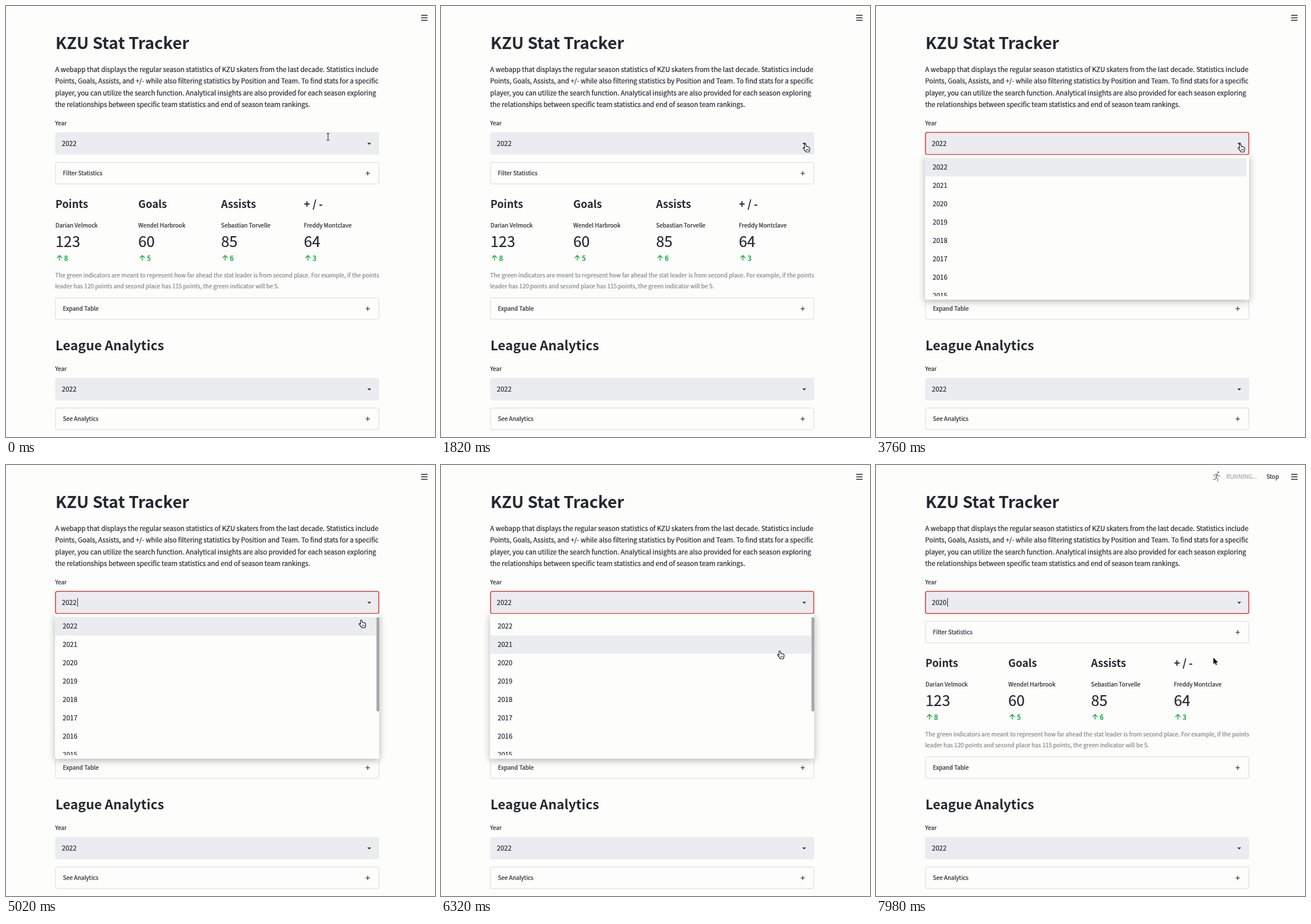
Recreate the animation shown at these times as an HTML page with a canvas. Size 746 px wide and 751 px high, loop 8 s.

```html
<!DOCTYPE html>
<html lang="en">
<head>
<meta charset="utf-8">
<title>Stat Tracker</title>
<style>
  html, body { margin: 0; width: 100%; height: 100%; overflow: hidden; background: #fdfdfd; }
  canvas { display: block; width: 746px; height: 751px; }
</style>
</head>
<body>
<canvas id="stage"></canvas>
<script>
const W = 746, H = 751, LOOP = 8000;
const FONT = '"Noto Sans CJK JP", "Noto Sans CJK SC", "Noto Sans CJK", sans-serif';
const EM = 0.8985; // the Latin glyphs of this family are drawn large
const INK = '#262730', FIELD = '#ebecf0', PAGE = '#fdfdfc';
const LEFT = 85.5, WIDE = 563.5;
const FOCUS = 2250, OPEN = 2280, PICK = 7360, RUN = 7600, BLINK = 450;

const INTRO = [
  'A webapp that displays the regular season statistics of KZU skaters from the last decade. Statistics include',
  'Points, Goals, Assists, and +/- while also filtering statistics by Position and Team. To find stats for a specific',
  'player, you can utilize the search function. Analytical insights are also provided for each season exploring',
  'the relationships between specific team statistics and end of season team rankings.'
];
const NOTE = [
  'The green indicators are meant to represent how far ahead the stat leader is from second place. For example, if the points',
  'leader has 120 points and second place has 115 points, the green indicator will be 5.'
];
const LEADERS = [
  ['Points', 'Darian Velmock', '123', '8'],
  ['Goals', 'Wendel Harbrook', '60', '5'],
  ['Assists', 'Sebastian Torvelle', '85', '6'],
  ['+ / -', 'Freddy Montclave', '64', '3']
];
// time, x, y of the pointer's hot spot
const PATH = [
  [0, 560, 228], [100, 560, 228], [760, 627.5, 239], [1300, 627.5, 239],
  [1800, 633.5, 241], [4700, 633.5, 241], [5500, 589, 324.5],
  [6500, 589, 324.5], [7000, 586.7, 335.8], [LOOP, 586.7, 335.8]
];

const canvas = document.getElementById('stage');
const ratio = window.devicePixelRatio || 1;
canvas.width = W * ratio;
canvas.height = H * ratio;
const c = canvas.getContext('2d');
c.scale(ratio, ratio);

const clamp = v => Math.max(0, Math.min(1, v));

function text(str, x, y, size, color = INK, weight = 400) {
  c.font = `${weight} ${size * EM}px ${FONT}`;
  c.fillStyle = color;
  c.fillText(str, x, y);
  if (weight >= 700) return;
  // a hairline gives body text its slightly fuller weight
  c.strokeStyle = color;
  c.lineWidth = weight > 400 ? 0.5 : 0.22;
  c.strokeText(str, x, y);
}

function box(x, y, w, h, r, fill, line, width = 1) {
  c.beginPath();
  c.roundRect(x, y, w, h, r);
  if (fill) { c.fillStyle = fill; c.fill(); }
  if (line) { c.strokeStyle = line; c.lineWidth = width; c.stroke(); }
}

function lines(color, width, ...paths) {
  c.strokeStyle = color;
  c.lineWidth = width;
  c.beginPath();
  for (const p of paths) {
    c.moveTo(p[0], p[1]);
    for (let i = 2; i < p.length; i += 2) c.lineTo(p[i], p[i + 1]);
  }
  c.stroke();
}

function select(y, value, focused) {
  box(LEFT, y, WIDE, 39, 3, FIELD);
  if (focused) box(LEFT + 0.7, y + 0.3, WIDE - 1.4, 38.4, 3, null, '#e23a36', 1.6);
  text(value, 97, y + 24, 12.8);
  c.fillStyle = INK;
  c.beginPath();
  c.moveTo(628.3, y + 18.4);
  c.lineTo(635, y + 18.4);
  c.lineTo(631.65, y + 21.8);
  c.fill();
}

function expander(y, label) {
  box(LEFT + 0.5, y + 0.5, WIDE - 1, 37.5, 3, null, '#d8d8e0');
  text(label, 99, y + 23.4, 11.2);
  const m = y + 19.5;
  lines(INK, 1.2, [625.3, m, 632.7, m], [629, m - 3.7, 629, m + 3.7]);
}

function leader([title, name, value, lead], i) {
  const x = 86 + i * 144;
  text(title, x, 352, 20.3, INK, 700);
  text(name, x, 386, 11.2);
  text(value, x, 420, 28.8);
  const green = '#09ab3b';
  lines(green, 1.4, [x + 7, 443.5, x + 7, 435], [x + 2.7, 439, x + 7, 434.7, x + 11.3, 439]);
  text(lead, x + 15.3, 444, 12.8, green, 500);
}

function page(t) {
  c.fillStyle = PAGE;
  c.fillRect(0, 0, W, H);
  for (const y of [16.3, 20.6, 24.9]) lines(INK, 1.5, [722, y, 733, y]);
  text('KZU Stat Tracker', 86, 75.3, 31.7, INK, 700);
  INTRO.forEach((s, i) => text(s, 85.5, Math.round(114.7 + i * 20.45), 12.8));
  text('Year', 85.5, 208, 11.2);
  const focused = t >= FOCUS;
  select(220, t >= PICK ? '2020' : '2022', focused);
  const blinkOn = t >= PICK || Math.floor((t - FOCUS) / BLINK) % 2 === 0;
  if (focused && blinkOn) lines(INK, 1, [124.5, 232, 124.5, 247]);
  expander(272, 'Filter Statistics');
  LEADERS.forEach(leader);
  NOTE.forEach((s, i) => text(s, 85.5, 473 + i * 18.5, 11.2, '#83858b'));
  expander(508, 'Expand Table');
  text('League Analytics', 86, 600, 25.4, INK, 700);
  text('Year', 85.5, 636, 11.2);
  select(648, '2022', false);
  expander(700, 'See Analytics');
}

// shadow around the list only, so a fading panel is not tinted by it
function listShadow() {
  c.save();
  c.beginPath();
  c.rect(0, 259, W, H);
  c.rect(LEFT, 259, WIDE, 252.5);
  c.clip('evenodd');
  c.shadowColor = 'rgba(0,0,0,.3)';
  c.shadowBlur = 13 * ratio;
  c.shadowOffsetY = 3 * ratio;
  box(LEFT, 259.5, WIDE, 252, [0, 0, 3, 3], PAGE);
  c.restore();
}

function dropdown(t, y) {
  const shown = t < PICK
    ? 1 - (1 - clamp((t - OPEN) / 110)) ** 2
    : 1 - clamp((t - PICK) / 70);
  if (t < OPEN || shown <= 0) return;
  c.save();
  c.globalAlpha = shown;
  listShadow();
  box(LEFT, 259.5, WIDE, 252, [0, 0, 3, 3], PAGE);
  const row = Math.max(0, Math.floor((y - 265) / 32));
  c.fillStyle = FIELD;
  c.fillRect(LEFT, 265 + row * 32, 558.5, 32);
  c.save();
  c.beginPath();
  c.rect(LEFT, 265, WIDE, 240.5);
  c.clip();
  for (let i = 0; i < 8; i++) text(String(2022 - i), 98.5, 285 + i * 32, 12.8);
  c.restore();
  if (y > 262) box(644.3, 265, 4.7, 164.5, 2.3, '#a6a6a9');
  c.restore();
}

function runner(t) {
  const gray = '#8b8b91';
  const s = Math.cos((t - 7980) / 480 * Math.PI * 2);
  c.save();
  c.translate(592, 20);
  c.lineCap = c.lineJoin = 'round';
  c.fillStyle = gray;
  c.beginPath();
  c.arc(3.2, -7.3, 1.8, 0, 7);
  c.fill();
  lines(gray, 2.4, [1.2, -3.8, -0.6, 1.6]);
  lines(gray, 1.4,
    [1, -4, -3 * s, -3.4, -4.4 * s, -0.4],
    [1.4, -3.6, 1.4 + 2 * s, -1, 1.4 + 4.6 * s, -0.6],
    [-0.6, 1.8, -0.6 + 3 * s, 4, -0.6 + 2.6 * s, 8.5],
    [-0.6, 1.8, -0.6 - 1.4 * s, 5, -0.6 - 5.6 * s, 5.4]);
  c.restore();
}

function status(t) {
  if (t < RUN) return;
  runner(t);
  text('RUNNING...', 609, 24, 11.2, '#a5a6ae');
  text('Stop', 679, 24, 11.2);
}

function pointerAt(t) {
  const i = PATH.findIndex(p => p[0] > t);
  const [t0, x0, y0] = PATH[i - 1], [t1, x1, y1] = PATH[i];
  const p = (t - t0) / (t1 - t0), e = p * p * (3 - 2 * p);
  return [x0 + (x1 - x0) * e, y0 + (y1 - y0) * e];
}

const HAND = new Path2D(
  'M-1.3 .8Q-1.2-.6 0-.5Q1.1-.4 1.3 .8L1.9 4Q3.4 3.2 4 4.5Q5.4 3.9 5.9 5.1' +
  'Q7.5 4.9 7.7 6.7L7.8 9Q7.6 10.5 6.8 11.5L6.7 13.2H.8L.6 12Q-1 10.8-2 9.1' +
  'L-3.8 7Q-4.3 5.8-3 5.5Q-2 5.5-1 6.9Z');
const ARROW = new Path2D('M0 0V11.2L2.6 8.8L4.4 12.7L6.2 11.9L4.5 8.1H8Z');

function pointer(t, x, y) {
  c.save();
  c.translate(x, y);
  c.lineJoin = 'round';
  if (t >= PICK) {
    c.strokeStyle = '#fff';
    c.lineWidth = 1.8;
    c.stroke(ARROW);
    c.fillStyle = '#000';
    c.fill(ARROW);
  } else if (x < 610 && y < 259) {
    const bar = [
      [-2.8, -6.3, -0.9, -6, 0, -5, 0.9, -6, 2.8, -6.3],
      [0, -5, 0, 5],
      [-2.8, 6.3, -0.9, 6, 0, 5, 0.9, 6, 2.8, 6.3]
    ];
    lines('#fff', 2.4, ...bar);
    lines('#111', 1.1, ...bar);
  } else {
    c.fillStyle = '#fff';
    c.fill(HAND);
    c.strokeStyle = '#111';
    c.lineWidth = 1.1;
    c.stroke(HAND);
    lines('#111', 0.8, [1.8, 8, 1.9, 10.8], [3.6, 8, 3.6, 10.8], [5.4, 8, 5.3, 10.8]);
  }
  c.restore();
}

const start = performance.now();
function draw() {
  const t = (performance.now() - start) % LOOP;
  const [x, y] = pointerAt(t);
  page(t);
  dropdown(t, y);
  status(t);
  pointer(t, x, y);
  requestAnimationFrame(draw);
}
draw();
</script>
</body>
</html>
```
